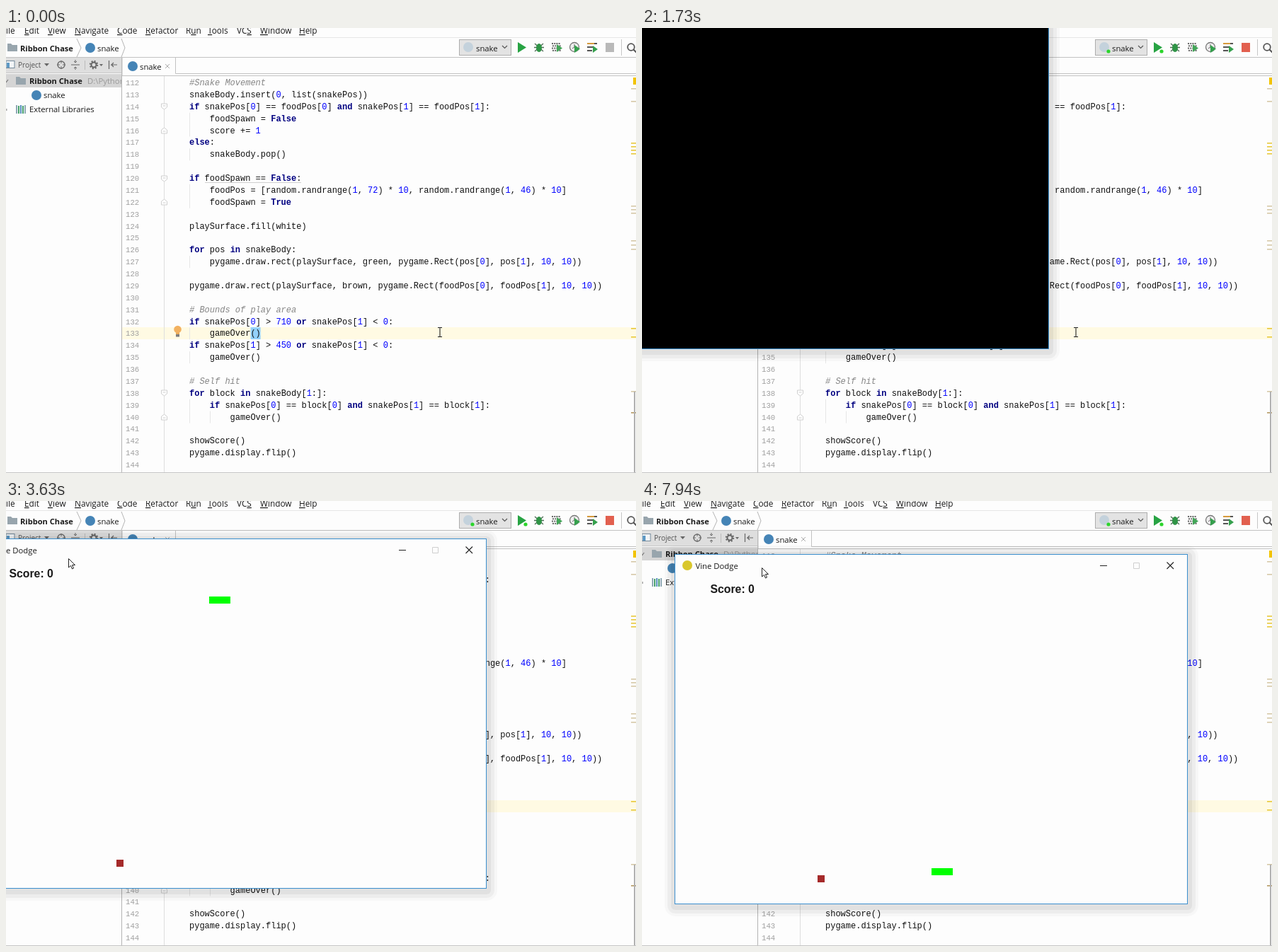
These frames come from a looping animation (890 by 629 pixels, 8 s). An HTML page:

```html
<!DOCTYPE html>
<html lang="en">
<head>
<meta charset="utf-8">
<title>Code editor and game window</title>
<style>
html, body { margin: 0; width: 100%; height: 100%; overflow: hidden; background: #fdfdfd; }
svg { display: block; width: 890px; height: 629px; }
text { white-space: pre; font-family: "Open Sans", "Noto Sans", sans-serif; font-size: 11.3px; fill: #1a1a1a; }
.menu { font-size: 11.8px; }
.bold { font-weight: 700; font-size: 11.1px; }
.code { font: 12px "Liberation Mono", "Courier New", monospace; fill: #111; }
.num { font: 10.7px "Liberation Mono", "Courier New", monospace; fill: #a0a0a0; }
.kw { font-weight: 700; fill: #000080; }
.lit { fill: #0000ff; }
.com { font-style: italic; fill: #858585; }
.score { font: 700 15.8px "Liberation Sans", Arial, sans-serif; }
.crisp { shape-rendering: crispEdges; }
</style>
</head>
<body>
<svg id="stage" viewBox="0 0 890 629"></svg>
<script>
const LOOP = 8000, CELL_MS = 64.6, WIN_W = 724, WIN_H = 494;
const RUN = 1300, OPEN = 1580, OPENED = 1730, PLAY = 1725, FIRST_FLIP = 1790, DRAG = 3340, RESUME = 4580;

const FIRST_LINE = 112, PITCH = 16.875, CODE_X = 259, CHAR = 7.2;
const code = `#Snake Movement
snakeBody.insert(0, list(snakePos))
if snakePos[0] == foodPos[0] and snakePos[1] == foodPos[1]:
    foodSpawn = False
    score += 1
else:
    snakeBody.pop()

if foodSpawn == False:
    foodPos = [random.randrange(1, 72) * 10, random.randrange(1, 46) * 10]
    foodSpawn = True

playSurface.fill(white)

for pos in snakeBody:
    pygame.draw.rect(playSurface, green, pygame.Rect(pos[0], pos[1], 10, 10))

pygame.draw.rect(playSurface, brown, pygame.Rect(foodPos[0], foodPos[1], 10, 10))

# Bounds of play area
if snakePos[0] > 710 or snakePos[1] < 0:
    gameOver()
if snakePos[1] > 450 or snakePos[1] < 0:
    gameOver()

# Self hit
for block in snakeBody[1:]:
    if snakePos[0] == block[0] and snakePos[1] == block[1]:
        gameOver()

showScore()
pygame.display.flip()
`.split("\n");

const rect = (x, y, w, h, fill, more = "") =>
  `<rect x="${x}" y="${y}" width="${w}" height="${h}" fill="${fill}" ${more}/>`;
const path = (d, stroke, width = 1, fill = "none") =>
  `<path d="${d}" stroke="${stroke}" stroke-width="${width}" fill="${fill}"/>`;
const disc = (x, y, r, fill, more = "") => `<circle cx="${x}" cy="${y}" r="${r}" fill="${fill}" ${more}/>`;
const label = (x, y, s, cls = "", more = "") => `<text x="${x}" y="${y}" class="${cls}" ${more}>${s}</text>`;
const folder = (x, y) => path(`M${x} ${y}h5l2 2h7v9h-14z`, "none", 0, "#98a5ad");
const BLUE = "#4584b6";

function highlight(s) {
  const entity = { "<": "&lt;", ">": "&gt;" };
  return s.replace(/(#.*)|\b(if|and|or|else|for|in|False|True)\b|\b(\d+)\b|([<>])/g, (m, com, kw, lit, sign) =>
    sign ? entity[sign] : `<tspan class="${com ? "com" : kw ? "kw" : "lit"}">${m}</tspan>`);
}

function editor() {
  let out = rect(164, 423, 726, 17, "#fffae3") + rect(345.6, 423, 14, 17, "#93d0fa");
  out += path("M223.5 68V628", "#dedede");
  code.forEach((line, i) => {
    const y = 81 + i * PITCH, indent = line.search(/\S|$/);
    out += label(169, y, FIRST_LINE + i, "num");
    for (let c = 0; c < indent; c += 4)
      out += path(`M${Math.round(CODE_X + c * CHAR) + .5} ${y - 12}v17`, "#e6e6e6");
    out += label(CODE_X + indent * CHAR, y, highlight(line.trim()), "code");
  });
  for (const [n, flip] of [[114, 1], [116, -1], [120, 1], [122, -1], [138, 1], [140, -1]]) {
    const y = Math.round(77.5 + (n - FIRST_LINE) * PITCH);
    out += path(`M219.5 ${y - 4 * flip}h8v${5 * flip}l-4 ${3 * flip}l-4 ${-3 * flip}zM221.5 ${y - flip}h4`, "#cfcfcf", 1, "#fff");
  }
  out += path("M281 218.5H417", "#d0d0d0");
  out += rect(886, 70, 4, 10, "#f2c300");
  const marks = { "#d6c9a8": [86, 104, 252, 257, 262, 301, 307, 313, 514], "#e8c93a": [163, 168, 173, 178, 425, 437], "#b59a63": [544] };
  for (const [color, ys] of Object.entries(marks))
    for (const y of ys) out += rect(883, y - 1, 7, 1.6, color);
  return out + rect(887, 514, 2, 115, "#b0b0b0") + path("M0 628.5H890", "#c4c4c4");
}

function menuBar() {
  const items = [[-6, "File"], [26, "Edit"], [59, "View"], [97, "Navigate"], [157, "Code"], [197, "Refactor"],
    [254, "Run"], [285, "Tools"], [326, "VCS"], [359, "Window"], [414, "Help"]];
  return items.map(([x, s]) => {
    const k = s == "Run" ? 1 : s == "VCS" ? 2 : 0;
    return label(x, 8, `${s.slice(0, k)}<tspan text-decoration="underline">${s[k]}</tspan>${s.slice(k + 1)}`, "menu");
  }).join("") + path("M0 13.5H890", "#e6e6e6");
}

function toolbar() {
  let out = folder(2, 22) + label(20, 33, "Ribbon Chase", "bold") + disc(119, 28, 7, BLUE) + label(129, 33, "snake");
  out += path("M100 15L106 28L100 41M163 15L168 28L163 41", "#b4b4b4");
  out += rect(640.5, 16.5, 73, 22, "#e3e3e3", 'stroke="#adadad"') + disc(653, 27, 7, "#c4d2dc");
  out += label(664, 33, "snake") + path("M701 25l3.500 3.500l3.500-3.500", "#555", 1.2);
  out += path("M723 20L735 27.500L723 35z", "none", 0, "#27a343");
  // debug
  out += path("M747 22l12 11M759 22l-12 11M746 27.500h14", "#4d6a55", 1.3) + `<ellipse cx="753" cy="28" rx="4" ry="6" fill="#2f9446"/>`;
  // coverage
  for (let i = 0; i < 16; i++)
    out += rect(771 + (i % 4) * 3.2 + (i >> 2) % 2, 21 + (i >> 2) * 3.3, 2, 2, "#666");
  out += path("M778 23L786 28.500L778 34z", "none", 0, "#43a558");
  // profile
  out += disc(803, 27, 6.500, "#eee", 'stroke="#777" stroke-width="1.3"') + path("M803 23v4l-3 2", "#666");
  out += path("M803 24L811 29.500L803 35z", "none", 0, "#35a04d");
  out += path("M821 22h14M821 27h9M821 32h7", "#555", 2) + path("M821 22h10", "#d69a3c", 2) + path("M829 25L836 30L829 35z", "none", 0, "#35a04d");
  out += rect(847, 21, 12, 13, "#b9b9b9", 'id="stop"') + path("M869.500 16V39", "#c6c6c6");
  out += disc(883, 27, 4.800, "none", 'stroke="#555" stroke-width="1.8"') + path("M886.500 30.500l4 4", "#555", 2.200);
  out += `<g id="running">${disc(659, 33, 2.600, "#2bd52b")}${disc(734, 33, 2.600, "#2bd52b")}</g>`;
  return out + path("M0 41.500H890", "#c2c2c2");
}

function projectPanel() {
  let out = rect(0, 42, 163, 21, "#dedede") + rect(0, 65, 163, 19, "#d5d5d5") + path("M0 63.500H163", "#c8c8c8");
  out += rect(0, 46.500, 12, 10, "#f2f5f7", 'stroke="#74899a"') + rect(1, 49, 4, 7, "#5d99c4");
  out += label(17, 56, "Project", "", 'style="font-size:10px;fill:#555"') + path("M54 50h7l-3.500 4z", "none", 0, "#666");
  out += disc(78, 52, 5, "none", 'stroke="#6b6b6b" stroke-width="1.400"') + path("M78 46v4M78 54v4M72 52h4M80 52h4", "#6b6b6b");
  out += path("M92 52h12M98 45v4l-2-2M98 49l2-2M98 59v-4l-2 2M98 55l2 2", "#666") + path("M111.500 46V59", "#bbb");
  out += disc(124, 52, 3.500, "none", 'stroke="#666" stroke-width="2"');
  out += disc(124, 52, 5.200, "none", 'stroke="#666" stroke-width="2" stroke-dasharray="2 2.08"');
  out += path("M132 51h5l-2.500 3z", "none", 0, "#666") + path("M145.500 46v12M157 52h-8l3-3M149 52l3 3", "#666", 1.2);
  out += path("M0 77L3 73", "#777", 1.2) + folder(14, 69) + label(33, 79, "Ribbon Chase", "bold");
  out += `<svg width="163" height="629">${label(115, 79, "D:\\Python", "", 'style="fill:#999"')}</svg>`;
  out += disc(43, 95, 7, BLUE) + label(53, 99, "snake") + rect(0, 114, 1.500, 3, "#aaa");
  ["#8fa9b5", "#45a06b", "#5790bb", "#45a06b", "#8fa9b5"].forEach((c, i) => out += rect(14 + i * 3, 109 + i % 2, 2, 12 - i % 2, c));
  return out + label(33, 119, "External Libraries") + path("M163.500 42V628", "#b4b4b4");
}

function tabs() {
  return path("M164 42V67.500H890M239.500 42V64.500H890", "#c2c2c2") + disc(179, 54, 7, BLUE) +
    label(189, 59, "snake") + path("M225 51l6 6M231 51l-6 6", "#aaa");
}

function gameWindow() {
  const shadow = [[15, .025], [11, .04], [6, .05]].map(([e, a]) =>
    rect(-e, 2 - e, WIN_W + 2 * e, WIN_H + 2 * e, "#000", `rx="${e}" opacity="${a}"`)).join("");
  const content = disc(17, 15, 7, "#d9c72c") + label(28.500, 20, "Vine Dodge") +
    path("M600 15.500h10M694.500 10.500l9.500 9.500M704 10.500l-9.500 9.500", "#222", 1.1) +
    path("M647.500 11.500h8v8h-8z", "#cfcfcf") + label(49.500, 54, "Score: 0", "score") +
    `<g class="crisp" transform="translate(.5 31) scale(1.004)">${rect(200, 420, 10, 10, "#a52a2a")}
     <g fill="#00ff00">${'<rect class="cell" width="10" height="10"/>'.repeat(3)}</g></g>`;
  const body = rect(-.5, -.5, WIN_W, WIN_H, "#fdfdfd", 'id="body" stroke="#3b8fce"');
  return `<g id="win">${shadow}${body}<g id="content">${content}</g></g>`;
}

const cursors = `<g id="beam">${path("M-3 -6.500h2.500l.5 .5l.5-.5h2.500M0 -6V6M-3 6.500h2.500l.5-.5l.5 .5h2.500", "#222", 1.1)}</g>
  <g id="arrow">${path("M.5 .5V13L3.500 10.300L5.500 15L7.500 14L5.500 9.500H9.500z", "#222", 1, "#fff")}</g>`;
const bulb = `<g id="bulb">${disc(242.500, 426, 5.300, "#f2b160")}${rect(240, 431, 5, 2, "#e5a95a")}${rect(240, 433, 5, 3.500, "#7d7d7d")}</g>`;

document.getElementById("stage").innerHTML = rect(0, 0, 890, 629, "#fdfdfd") + editor() + bulb +
  rect(359.500, 423, 2, 17, "#111", 'id="caret"') + menuBar() + toolbar() + projectPanel() + tabs() + gameWindow() + cursors;

const $ = id => document.getElementById(id);
const cells = document.querySelectorAll(".cell");
const show = (id, on) => $(id).setAttribute("visibility", on ? "visible" : "hidden");
const place = (id, [x, y], more = "") => $(id).setAttribute("transform", `translate(${x} ${y}) ${more}`);

const ticks = [0, 310, 720, 1300, 1580, 1730, 1850, 2000, 2120, 2270, 2420, 2550, 2670, 2820, 2940, 3090, 3210, 3360, 3510, 3630,
  3750, 3900, 4020, 4150, 4580, 4700, 4850, 4970, 5100, 5220, 5350, 5480, 5630, 5780, 5920, 6050, 6200, 6350, 6480, 6620,
  6740, 6890, 7010, 7150, 7290, 7430, 7560, 7700, 7820, 7940];
const winTrack = [[DRAG, -149, -40], [3630, -45, 54], [3900, 35, 74], [4150, 47, 76]];
const mouseTrack = [[2120, 613, 430], [2270, 480, 300], [2420, 230, 110], [2550, 40, 5], [2670, -27, -22],
  [DRAG, -27, -22], [3630, 88, 81], [3900, 160, 94], [4150, 169, 94]];

function along(track, t) {
  const i = track.findIndex(k => k[0] >= t);
  if (i <= 0) return (i ? track[track.length - 1] : track[0]).slice(1);
  const [t0, x0, y0] = track[i - 1], [t1, x1, y1] = track[i], p = (t - t0) / (t1 - t0);
  return [x0 + (x1 - x0) * p, y0 + (y1 - y0) * p].map(Math.round);
}

// Right along row 5, down column 45, then left along row 41
const cellAt = n => [n < 45 ? n : n < 81 ? 45 : 126 - n, 5 + Math.min(36, Math.max(0, n - 45))];
// The game stands still while its window is dragged
const headAt = t => t < RESUME
  ? 10 + Math.round((Math.min(t, DRAG) - PLAY) / CELL_MS)
  : 38 + Math.round((t - RESUME) / CELL_MS);

function draw(t) {
  const running = t >= RUN, opening = t < OPENED, blank = t < FIRST_FLIP, mouse = along(mouseTrack, t);
  show("caret", t >= 310 && !running);
  show("bulb", t < 720);
  show("running", running);
  $("stop").setAttribute("fill", running ? "#e2604f" : "#b9b9b9");

  $("win").style.display = t >= OPEN ? "" : "none";
  $("win").setAttribute("opacity", opening ? .4 : 1);
  $("body").setAttribute("fill", blank ? "#000" : "#fdfdfd");
  $("content").style.display = blank ? "none" : "";
  const cx = WIN_W / 2, cy = WIN_H / 2;
  place("win", along(winTrack, t), opening ? `translate(${cx} ${cy}) scale(.964) translate(${-cx} ${-cy})` : "");

  const head = headAt(t);
  cells.forEach((cell, i) => {
    const [col, row] = cellAt(head - i);
    cell.setAttribute("x", col * 10);
    cell.setAttribute("y", row * 10);
  });

  show("beam", t < 2270);
  show("arrow", t >= 2270);
  place("beam", mouse);
  place("arrow", mouse);
}

const start = performance.now();
function frame() {
  const t = (performance.now() - start) % LOOP;
  draw(ticks.findLast(k => k <= t));
  requestAnimationFrame(frame);
}
frame();
</script>
</body>
</html>
```
